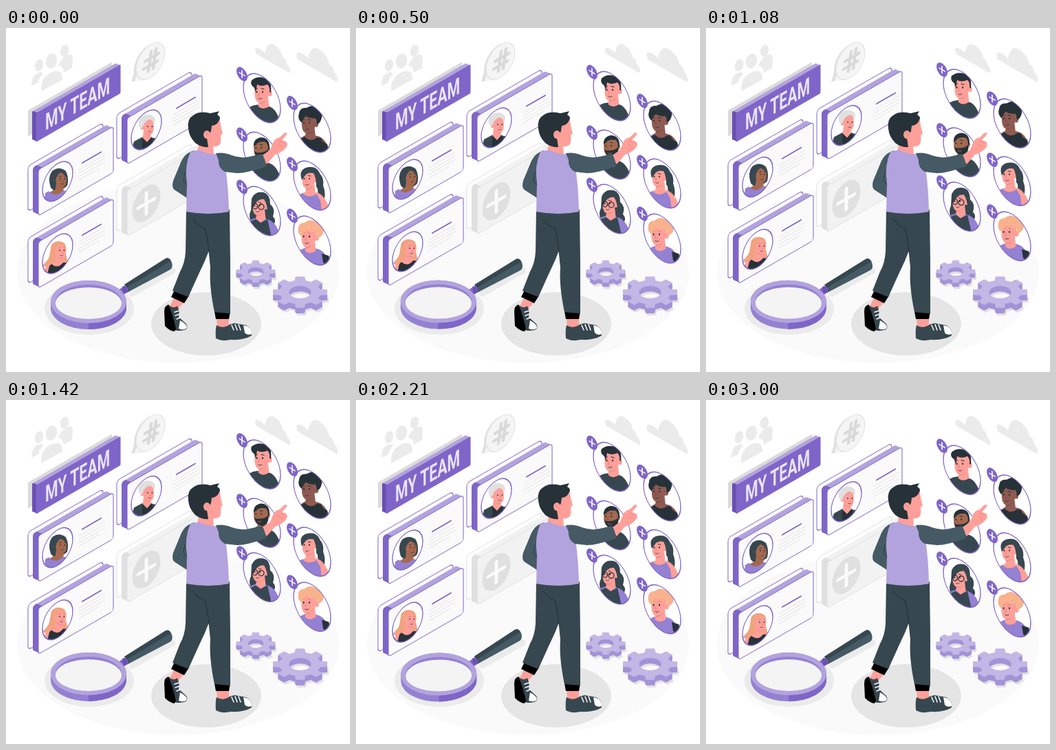
These frames come from a looping animation (500 px wide and 500 px high, 3.04 s). An HTML page:

```html
<!DOCTYPE html>
<html lang="en">
<head>
<meta charset="utf-8">
<title>My team</title>
<style>
html, body { margin: 0; width: 100%; height: 100%; overflow: hidden; background: #fff; }
svg { display: block; width: 100vw; height: 100vh; }
text { font: 600 33.5px Roboto, "Liberation Sans", sans-serif; }
</style>
</head>
<body>
<svg id="stage" viewBox="0 0 500 500"></svg>
<script>
const PURPLE = '#7f65c8', MID = '#9481d2', LIGHT = '#b2a3de', SOFT = '#c2b7e5',
      SLATE = '#37474f', STEEL = '#455a64', INK = '#263238',
      PINK = '#ff9f99', BROWN = '#a5694f', DARK = '#8f5a52', GINGER = '#f2a27e', BLOND = '#f8b28d',
      GREY = '#e0e0e0', PALE = '#ebebeb';

// Drawing helpers
const path = (d, fill, more = '') => `<path d="${d}" fill="${fill}" ${more}/>`;
const line = (d, color, w = 1) => path(d, 'none', `stroke="${color}" stroke-width="${w}" stroke-linecap="round" stroke-linejoin="round"`);
const oval = (x, y, rx, ry, fill, more = '') => `<ellipse cx="${x}" cy="${y}" rx="${rx}" ry="${ry}" fill="${fill}" ${more}/>`;
const rect = (x, y, w, h, r, fill, more = '') => `<rect x="${x}" y="${y}" width="${w}" height="${h}" rx="${r}" fill="${fill}" ${more}/>`;
const group = (transform, body) => `<g transform="${transform}">${body}</g>`;
const at = (x, y, body) => group(`translate(${x} ${y})`, body);
const iso = (x, y, tilt, body) => group(`translate(${x} ${y}) skewY(${tilt})`, body);

// A slab on the left wall; the origin is the lower left corner of its front
function slab(w, h, depth, r, front, top, side, edge) {
  const dx = -depth, dy = -depth, t = r - h;
  const soft = c => `stroke="${c}" stroke-width="${2 * r}" stroke-linejoin="round"`;
  return path(`M${dx + r} ${dy + t}L${dx + w - r} ${dy + t}L${w - r} ${t}L${r} ${t}Z`, top, soft(top)) +
    path(`M${dx + r} ${dy + t}L${r} ${t}L${r} ${-r}L${dx + r} ${dy - r}Z`, side, soft(side)) +
    rect(0, -h, w, h, r, front, `stroke="${edge}"`);
}

const backPlate = color => rect(-15, -81, 109, 66, 5, '#fff', `stroke="${color}"`);

function card(x, y, portrait, shift = 0) {
  const rows = [0, 5, 10, 15].map(d => line(`M${59 + shift} ${d - 33}h${d < 15 ? 38 : 30}`, GREY, .9)).join('');
  return iso(x, y, -30, backPlate(PURPLE) +
    slab(109, 67, 8, 4, '#fafafa', LIGHT, PURPLE, PURPLE) + rows +
    line(`M${64 + shift} -40h27`, PURPLE, 2)) +
    at(x + 28, y - 50, medal('left', 22, 26, -30, portrait));
}

function emptyCard(x, y) {
  return iso(x, y, -30, backPlate(GREY) +
    slab(109, 67, 8, 4, '#f2f2f2', '#f2f2f2', GREY, GREY) +
    oval(28, -32, 20.5, 25, GREY) + line('M16 -32h24M28 -47v30', '#fafafa', 5));
}

function medal(clip, rx, ry, tilt, portrait) {
  const tilted = `transform="skewY(${tilt})"`;
  return oval(0, 0, rx, ry, '#fff', tilted) + `<g clip-path="url(#${clip})">${portrait}</g>` +
    oval(0, 0, rx, ry, 'none', `${tilted} stroke="${PURPLE}" stroke-width="1.3"`);
}

function candidate(x, y, badgeY, portrait) {
  return at(x, y, medal('right', 27, 32, 30, portrait)) +
    iso(x - 29, badgeY, 30, oval(0, 0, 8, 9.3, PURPLE) + line('M-4 0h8M0 -5v10', '#fff', 1.6));
}

// A head looking right, or left when the size is negative
function face(x, y, size, skin, hair = INK) {
  return group(`translate(${x} ${y}) scale(${size} ${Math.abs(size)})`,
    path('M-7 2L5 8L6 19Q0 25-9 19Z', skin) + path('M-6 10Q0 15 5 13L5 15Q-1 16-6 10Z', '#0002') +
    oval(-10, 1, 3, 4, skin) +
    path('M-10-7Q-8-15 1-15Q11-14 11-4Q12 9 7 13Q3 15-2 12Q-10 7-10-7Z', skin) +
    oval(0, -1, 1, 1.4, INK) + oval(8, -1, 1, 1.4, INK) +
    line('M-2-5l4-1M7-6l3 1', hair, 1) + line('M5 0l1 4h-2', '#0003', .8) + line('M1 8q3 2 5 0', INK, .8));
}

// Portraits, centred on their medals
const elder = path('M-22 32L-18 17L-5 10L6 11L17 13L24 32Z', SLATE) + face(2, -4, .8, PINK, '#bbb') +
  path('M-6 11L1 17L8 10L12 26L-6 30Z', INK) + path('M-6 11L1 18L7 11L4 8L-4 8Z', PINK) +
  path('M-8-1Q-14-9-10-16Q-3-25 8-21Q15-18 12-9Q9-15 4-15Q-3-12-5-5Z', GREY);
const bobbed = path('M-10 9Q-15-6-8-15Q2-23 12-15Q17-5 14 6Q10 12-6 13Z', SLATE) +
  path('M-20 32L-15 18L-5 12L8 13L19 16L20 32Z', BROWN) + face(4, -3, .8, BROWN) +
  path('M-18 17L-13 14Q-3 24 7 14L12 14L19 35L-20 35Z', MID) +
  path('M-5 6Q-10-12 2-17Q13-17 13-5Q9-12 4-13Q-3-8-3 3Z', SLATE);
const ginger = path('M-9-13Q0-22 10-15Q14-9 12 0L15 13L-5 18Q-15 22-22 17Q-11 8-11-2Z', GINGER) +
  path('M-22 34L-17 18L-4 12L8 12L18 16L22 34Z', PINK) + face(3, -4, .8, PINK, '#c9775a') +
  path('M-12 18L-9 15Q0 23 8 13L12 13L16 32L-16 34Z', INK) +
  path('M-6 10Q-12 0-9-12Q0-21 10-15L12-8Q7-14 3-14Q-4-9-4-2Q-4 5-6 10Z', GINGER);
const quiff = path('M-26 40L-18 13Q-10 8-2 10L10 12Q22 14 30 45Z', SLATE) + face(1, -8, -1.05, PINK) +
  path('M-9-8L-11-15Q-18-20-15-26Q-6-33 4-29Q15-27 13-8L11-9Q12-16 8-20Q-1-16-7-20Q-8-14-9-8Z', INK);
const curly = path('M-25 30L-17 15L-7 9L8 12Q23 16 28 45L-20 40Z', DARK) + face(-4, -6, -1, DARK) +
  path('M-16 16L-11 13Q-2 22 7 14L13 15Q14 21 22 24L25 45L-20 32Z', INK) +
  path('M-15-7Q-22-13-19-21Q-18-30-8-29Q1-35 8-28Q16-24 14-15Q12-6 7-5L5-14Q-3-13-9-17Q-14-13-15-7Z', INK);
const bearded = path('M-28 32L-18 12L-7 5L9 9Q24 12 30 42L-10 40Z', SLATE) + face(-1, -12, -.98, BROWN) +
  path('M-12-14Q-13-26-2-28Q12-28 11-11L9-10Q9-17 6-21Q-6-24-12-14Z', INK) +
  path('M-11-9Q-9-5-4-6Q5-6 9-11Q11 0 3 4Q-9 6-11-9Z', INK) + line('M-6-2q3 1 5 0', BROWN, 1);
const ponytail = path('M3-22Q18-17 16 0Q21 13 16 24Q8 20 8 6Z', SLATE) +
  path('M-28 26L-17 12L-6 8L7 10Q20 14 27 40L-10 38Z', PINK) + face(-4, -9, -.95, PINK) +
  path('M-20 14L-14 11Q-5 20 6 12L12 22L14 38L-24 28Z', MID) +
  path('M-15-8Q-20-22-9-26Q6-30 11-18Q14-4 8 4L6 2Q6-11 2-18Q-6-20-10-15Z', SLATE);
const glasses = path('M-15-18Q-10-30 3-27Q12-24 12-10Q20-4 16 8Q23 15 14 23L-16 16Q-20 6-16-1Z', SLATE) +
  path('M-28 26L-18 13L-6 9L8 12Q24 17 27 42L-12 38Z', MID) + face(-3, -7, -.95, PINK) +
  path('M-16 15L-9 12L-2 17L8 12L14 38L-12 34Z', SLATE) + path('M-9 10L-2 17L6 11Z', PINK) +
  path('M-13-5Q-18-19-8-25Q8-27 11-9L8 2Q8-10 3-17Q-6-19-13-5Z', SLATE) +
  `<g fill="none" stroke="${INK}" stroke-width="1.3">${oval(-10, -7, 3.5, 4, 'none') + oval(-1, -6, 4, 4, 'none')}</g>`;
const blond = path('M-28 30L-18 14L-7 9L8 12Q23 17 29 44L-12 38Z', MID) + path('M14 19L24 22L30 42L16 32Z', INK) +
  face(-4, -5, -1.05, PINK, '#d98a66') +
  path('M-15-6Q-22-10-20-18Q-20-26-11-26Q-3-33 6-27Q18-26 17-15Q16-6 8-4L6-13Q-3-12-9-16Q-13-12-15-6Z', BLOND);

// Gear lying on the floor
function gear(x, y, rx, ry, depth) {
  const teeth = 8, ring = [];
  for (let i = 0; i < teeth; i++)
    for (const [turn, r] of [[-.29, .76], [-.2, 1], [.2, 1], [.29, .76]]) {
      const a = (i + turn) / teeth * 2 * Math.PI;
      ring.push(`${(rx * r * Math.cos(a)).toFixed(1)} ${(ry * r * Math.sin(a)).toFixed(1)}`);
    }
  const hx = rx * .42, hy = ry * .42;
  const d = `M${ring.join('L')}ZM${-hx} 0a${hx} ${hy} 0 0 0 ${2 * hx} 0a${hx} ${hy} 0 0 0 ${-2 * hx} 0Z`;
  const layer = (dx, dy, c) => at(x + dx, y + dy, path(d, c, `fill-rule="evenodd" stroke="${c}" stroke-linejoin="round"`));
  let out = layer(2, depth + 3, GREY);
  for (let k = depth; k > 0; k--) out += layer(0, k, '#a293d8');
  return out + layer(0, 0, SOFT);
}

const cloud = (x, y, size) => group(`translate(${x} ${y}) skewY(30) scale(${size})`,
  path('M3 0Q-2-11 8-12Q14-13 18-10Q22-33 34-33Q47-32 49-19Q54-22 56-12Q62-10 61-2Q60 1 56 0Z', PALE));

const icons =
  oval(85, 33, 6, 9, PALE, 'transform="rotate(15 85 33)"') + path('M76 55Q80 43 90 39Q97 37 97 45L96 58L84 65Q83 55 76 55Z', PALE) +
  oval(48, 54, 6, 9, PALE, 'transform="rotate(15 48 54)"') + path('M37 84Q37 69 46 65Q53 63 54 67Q48 72 47 79Z', PALE) +
  oval(66, 48, 8, 11, PALE, 'transform="rotate(15 66 48)"') + path('M51 92Q50 72 65 65Q82 57 82 75Z', PALE) +
  path('M187 62L182 78L200 75Z', GREY) + iso(207, 49, -30, oval(0, 0, 21, 24, GREY)) +
  path('M191 62L187 78L204 74Z', '#f5f5f5') + iso(210, 48, -30, oval(0, 0, 21, 24, '#f5f5f5', `stroke="${GREY}"`) +
    line('M-8 -4h20M-10 6h20M1 -13l-4 26M8 -13l-4 26', '#d9d9d9', 4.5)) +
  cloud(361, 36, .85) + cloud(421, 44, 1);

const banner = iso(44, 165, -30,
  rect(-12, -52, 122, 38, 1, '#dbdbdb') + slab(122, 41, 6, 1, PURPLE, LIGHT, '#6b50b4', PURPLE)) +
  `<text transform="matrix(.635 -.367 0 1 57 149)" fill="#e9e4f6">MY TEAM</text>`;

const board = card(47, 273, bobbed) + card(176, 198, elder, 8) + card(47, 378, ginger) + emptyCard(176, 303) +
  candidate(372, 102, 67, quiff) + candidate(445, 145, 109, curly) +
  candidate(372, 187, 155, bearded) + candidate(445, 229, 198, ponytail) +
  candidate(372, 266, 231, glasses) + candidate(445, 309, 273, blond);

const lens =
  path('M65 398A55 31 0 0 1 175 398V407A55 31 0 0 1 65 407Z', MID) +
  path('M120 398H175V407A55 31 0 0 1 120 438Z', PURPLE) +
  path('M163 381L175 373L180 382L167 390Z', PURPLE) +
  oval(120, 398, 55, 31, LIGHT) + oval(120, 398, 48, 25, MID) +
  path('M72 400A48 23 0 0 1 168 400A48 23 0 0 1 72 400Z', '#f4f4f4') +
  path('M172 373L232 335Q238 332 241 341Q243 348 239 351L177 384Q178 377 172 373Z', STEEL) +
  path('M172 373L232 335Q237 333 239 339L176 377Z', SLATE) +
  path('M169 376Q174 372 177 384L171 386Z', '#6b50b4');

const man =
  // Shoes and ankles
  path('M245 391L259 398L248 411L237 406Z', PINK) +
  path('M236 402Q243 409 249 404Q253 412 251 420L262 430Q266 437 259 439Q250 441 245 439L232 415Z', SLATE) +
  path('M236 402Q230 404 230 412L231 433Q237 440 245 441L247 437Q242 415 236 402Z', '#000') +
  path('M253 425Q264 431 263 436Q258 440 251 437Z', '#fff') +
  line('M245 413l6-2M246 418l6-2M248 423l5-2', '#fff', 1.4) +
  path('M306 420L324 420L324 434Q314 441 307 433Z', PINK) +
  path('M306 432Q315 438 325 431L332 429L349 432Q359 437 357 447Q346 454 327 453Q313 456 305 451Q304 439 306 432Z', SLATE) +
  path('M345 432Q358 434 357 445Q350 447 347 443Z', '#fff') +
  line('M328 432l3 7M333 431l3 8M338 431l3 8', '#fff', 1.5) +
  // Trousers
  path('M245 381L266 389L259 400L240 391Z', '#000') + path('M303 412H326L324 423H305Z', '#000') +
  path('M262 264H304L298 316Q290 338 279 360L265 391L242 382L253 354Q260 342 261 325Z', SLATE) +
  path('M276 264H325L326 340L326 415L303 413Q295 375 297 348L292 300Q276 290 276 264Z', SLATE) +
  line('M272 278Q279 288 289 291Q293 305 295 325', INK, 1.2) +
  // Far arm and torso
  path('M274 178Q259 181 253 198L243 222Q240 233 246 236L263 247L268 215Z', STEEL) +
  path('M281 165L301 168L302 186Q288 187 278 180Z', PINK) +
  path('M268 180L281 177Q292 184 306 183L316 186Q323 220 324 267Q295 273 262 267L263 225Q259 200 268 180Z', LIGHT) +
  line('M260 210L258 222L263 228', INK, .8) +
  // Pointing arm
  path('M370 187L384 177L388 167Q391 160 398 159L404 153Q409 150 408 155L401 163L407 165Q411 169 406 175Q399 182 391 184L379 198Z', PINK) +
  line('M398 164l6 3M396 169l6 4', '#e77f7b', .8) +
  path('M305 182Q317 180 328 185Q342 190 354 187L372 183Q377 190 378 201Q350 211 336 211L318 209Q308 203 309 192Z', STEEL) +
  // Head
  path('M291 137L311 134Q312 145 315 153L312 156Q313 164 311 169Q307 173 299 172L283 170Z', PINK) +
  path('M265 146Q263 132 272 127Q281 120 297 124L310 121L307 126Q313 129 310 134Q306 142 299 142L298 150L292 160L294 173Q284 174 275 167Q266 158 265 146Z', INK) +
  oval(292, 155, 5, 6, PINK) + line('M290 153q4-1 4 4', '#e77f7b', .8);

document.getElementById('stage').innerHTML =
  `<defs><clipPath id="left">${oval(0, 0, 22, 26, '#000', 'transform="skewY(-30)"')}</clipPath>` +
  `<clipPath id="right">${oval(0, 0, 27, 32, '#000', 'transform="skewY(30)"')}</clipPath></defs>` +
  oval(250, 356, 234, 131, '#fafafa') + icons + banner +
  oval(291, 430, 80, 46, '#e5e5e5') + oval(121, 408, 65, 38, '#ebebeb') +
  line('M183 386L242 353', '#ebebeb', 9) +
  `<g id="board">${board}</g>` +
  gear(363, 354, 28, 16, 6) + gear(427.5, 384, 39.5, 22.5, 8) +
  `<g id="lens">${lens}</g>` + man;

const LOOP = 3040;
const boardGroup = document.getElementById('board'), lensGroup = document.getElementById('lens');
const triangle = p => 1 - Math.abs(1 - 2 * (p % 1)); // 0 to 1 and back

function draw(now) {
  const p = now % LOOP / LOOP;
  boardGroup.setAttribute('transform', `translate(0 ${-9 * triangle(p)})`);
  lensGroup.setAttribute('transform', `rotate(${2 * triangle(p + .25) - 1} 153 386)`);
}

const start = performance.now();
(function tick() {
  draw(performance.now() - start);
  requestAnimationFrame(tick);
})();
</script>
</body>
</html>
```
